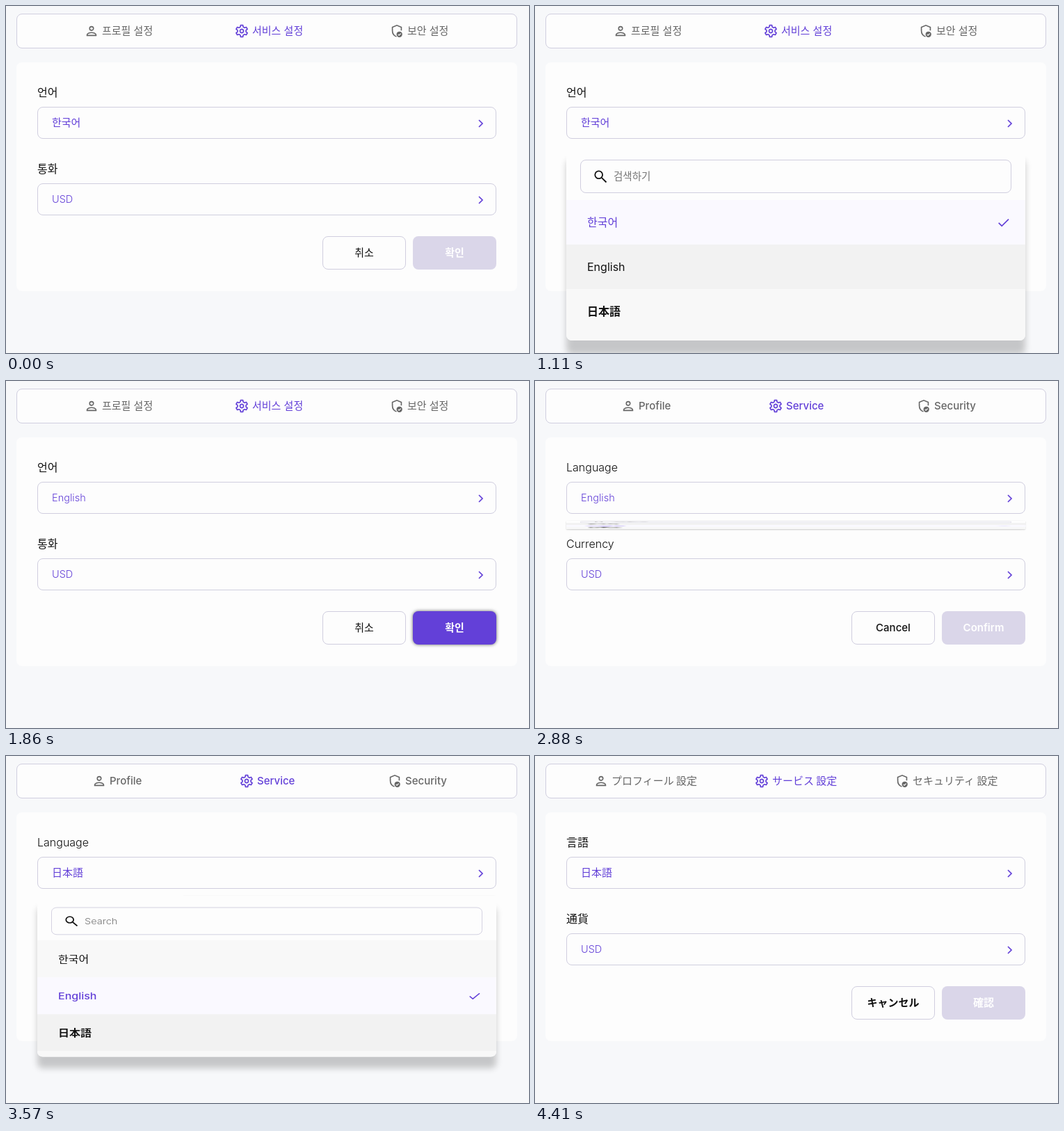
Recreate the animation shown at these times as an HTML page. Size 752 by 499 pixels, loop 5.82 s.

```html
<!DOCTYPE html>
<html lang="ko">
<head>
<meta charset="utf-8">
<title>Service settings</title>
<style>
@property --p { syntax: "<number>"; inherits: false; initial-value: 0; }

:root { --violet: #6340d8; --line: #d0cedf; --off: #dad6e9; --paper: #fdfdfd; --loop: 5820ms; }
html, body { margin: 0; width: 100%; height: 100%; overflow: hidden; background: #f7f8fa; }
body { position: relative; color: #111; font: 300 14.5px/20px Inter, sans-serif; }
div, span, svg { position: absolute; box-sizing: border-box; white-space: nowrap; }
svg { overflow: visible; fill: none; stroke: currentColor; }

/* languages */
[lang=ko] { font-family: "Noto Sans CJK KR", sans-serif; }
[lang=ja] { font-family: "Noto Sans CJK JP", sans-serif; }
span[lang=ko], span[lang=ja], .lang[lang=ko] span, .lang[lang=ja] span { margin-top: -1px; font-size: 15px; }
.lang { inset: 0; }
.lang.ko { animation: lang-ko var(--loop) step-end infinite; }
.lang.en { animation: lang-en var(--loop) step-end infinite; }
.lang.ja { animation: lang-ja var(--loop) step-end infinite; }
@keyframes lang-ko { 0% { visibility: visible } 40.722%, 100% { visibility: hidden } }
@keyframes lang-en { 0%, 75.773%, 100% { visibility: hidden } 40.722% { visibility: visible } }
@keyframes lang-ja { 0% { visibility: hidden } 75.773%, 100% { visibility: visible } }

/* frame */
.bar { left: 15px; top: 11px; width: 720px; height: 50px; border: 1px solid var(--line); border-radius: 8px; background: var(--paper); }
.card { left: 15px; top: 81px; width: 720px; height: 329px; border-radius: 8px; background: var(--paper); }
.field { left: 45px; width: 660px; height: 46px; border: 1px solid var(--line); border-radius: 8px; color: var(--violet); }
.field span { left: 20px; top: 12px; }
.field svg { left: 633px; top: 17px; stroke-width: 1.7; }

/* tabs */
.tab { top: 25px; height: 22px; color: #666; font-weight: 500; }
.tab svg { left: 0; top: 0; stroke-width: 1.8; }
.tab span { left: 26px; top: 1px; font-size: 15px; }
.tab.on { color: var(--violet); }
.lang .label { left: 45px; font-size: 16px; }
.lang[lang=ko] .label, .lang[lang=ja] .label { font-size: 16px; font-weight: 400; }

/* buttons */
.btn { top: 331px; width: 120px; height: 48px; border-radius: 8px; }
.cancel { left: 455px; border: 1px solid var(--line); background: var(--paper); animation: cancel var(--loop) step-end infinite; }
.confirm { left: 585px; background: var(--off); animation: confirm var(--loop) step-end infinite; }
.lang .cap { top: 345px; width: 120px; text-align: center; font-size: 15px; font-weight: 500; }
.lang[lang=ja] .cap, .lang .cap.ok { font-weight: 700; }
.lang[lang=en] .cap.ok { font-weight: 600; }
.no { left: 455px; }
.ok { left: 585px; color: #fff; }
@keyframes cancel {
  0%, 65.464%, 100% { border-color: var(--line); box-shadow: 0 0 5px #0000 }
  62.887% { border-color: var(--violet); box-shadow: 0 0 5px #000a }
}
@keyframes confirm {
  0%, 37.113%, 72.165%, 100% { background: var(--off); box-shadow: 0 0 5px #0000 }
  25.773%, 60.825% { background: var(--violet); box-shadow: 0 0 5px #0000 }
  31.959%, 66.495% { background: var(--violet); box-shadow: 0 0 5px #0009 }
  35.567%, 70.619% { background: var(--violet); box-shadow: 0 0 5px #0009; animation-timing-function: steps(3, start) }
}

/* chosen language */
.v1 { animation: v1 var(--loop) step-end infinite; }
.v2 { animation: v2 var(--loop) step-end infinite; }
.v3 { animation: v3 var(--loop) step-end infinite; }
@keyframes v1 { 0% { visibility: visible } 25.773%, 100% { visibility: hidden } }
@keyframes v2 { 0%, 60.825%, 100% { visibility: hidden } 25.773% { visibility: visible } }
@keyframes v3 { 0% { visibility: hidden } 60.825%, 100% { visibility: visible } }

/* drop-down */
.panel {
  --q: max(0, var(--p));
  left: 45px; top: 201px; width: 660px; height: 280px; border-radius: 8px;
  background: linear-gradient(var(--paper) 78px, #f8f8f8 78px);
  box-shadow: 0 20px 10px #0003;
  transform-origin: top;
  transform: scaleY(calc(var(--q) * var(--q) * (3 - 2 * var(--q))));
  animation: unfold var(--loop) linear infinite;
}
@keyframes unfold {
  0% { --p: 0 }
  11.34%, 49.485% { --p: 0; animation-timing-function: steps(8, start) }
  15.464%, 53.608% { --p: 1 }
  25.773%, 60.825% { --p: 1; animation-timing-function: steps(8, start) }
  29.897%, 64.948%, 100% { --p: -.06 }
}
.search { left: 20px; top: 20px; width: 620px; height: 48px; border: 1px solid var(--line); border-radius: 8px; }
.search svg { left: 19px; top: 14px; stroke-width: 1.8; }
.panel .hint { left: 68px; top: 34px; color: #757575; }
.panel .lang[lang=ko] .hint { font-size: 14.5px; }
.hover, .row { left: 0; width: 660px; height: 64px; }
.hover { top: 78px; background: #f2f2f2; animation: hover var(--loop) step-end infinite; }
@keyframes hover {
  0% { transform: translateY(64px) }
  49.485% { transform: none }
  54.639% { transform: translateY(64px) }
  56.701%, 100% { transform: translateY(128px) }
}
.r1 { top: 78px; }
.r2 { top: 142px; }
.r3 { top: 206px; }
.panel .row span { left: 30px; top: 22px; font-size: 16px; font-weight: 500; }
.panel .row span[lang=en] { margin-top: 0; font-family: Inter, sans-serif; font-weight: 400; }
.panel .row span[lang=ko] { margin-top: -1px; }
.panel .row span[lang=ja] { margin-top: -1px; font-weight: 700; }
.row svg { display: none; left: 621px; top: 27px; stroke-width: 1.7; }
.row.sel { color: var(--violet); background: #faf9ff; }
.panel .row.sel span[lang=en] { font-weight: 500; }
.row.sel svg { display: block; }
</style>
</head>
<body>
<svg width="0" height="0">
  <symbol id="person" viewBox="-12 -12 24 24">
    <circle cy="-4" r="3"/>
    <path d="M-7 7V6C-7 3.6-2.5 2.4 0 2.4S7 3.6 7 6V7Z"/>
  </symbol>
  <symbol id="gear" viewBox="-12 -12 24 24">
    <path stroke-linejoin="round" d="M-2.2-6.4-1.8-9.1H1.8L2.2-6.4 4.4-5.1 7-6.1 8.8-3 6.6-1.3V1.3L8.8 3 7 6.1 4.4 5.1 2.2 6.4 1.8 9.1H-1.8L-2.2 6.4-4.4 5.1-7 6.1-8.8 3-6.6 1.3V-1.3L-8.8-3-7-6.1-4.4-5.1Z"/>
    <circle r="2.8"/>
  </symbol>
  <symbol id="shield" viewBox="-12 -12 24 24">
    <path d="M-.6 8.8C-4.6 7.4-7 3.6-7-.6V-6L0-8.9 7-6V-.8"/>
    <circle cx="4" cy="5.2" r="4.5" fill="currentColor" stroke="none"/>
    <path stroke="#fdfdfd" stroke-width="1.3" d="M1.9 5.3 3.4 6.8 6.2 4"/>
  </symbol>
  <symbol id="chevron" viewBox="0 0 8 12"><path d="M1 1 6 6 1 11"/></symbol>
  <symbol id="check" viewBox="0 0 16 12"><path d="M.7 5.8 5.2 10.3 15 .7"/></symbol>
  <symbol id="lens" viewBox="0 0 20 20"><circle cx="6.7" cy="6.7" r="5.4"/><path d="M10.8 10.8 17.5 17.5"/></symbol>
</svg>

<div class="bar"></div>
<div class="card"></div>

<div class="field" style="top:145px">
  <span class="v1" lang="ko">한국어</span>
  <span class="v2" lang="en">English</span>
  <span class="v3" lang="ja">日本語</span>
  <svg width="8" height="12"><use href="#chevron"/></svg>
</div>
<div class="field" style="top:255px">
  <span lang="en">USD</span>
  <svg width="8" height="12"><use href="#chevron"/></svg>
</div>
<div class="btn cancel"></div>
<div class="btn confirm"></div>

<div class="lang ko" lang="ko">
  <div class="tab" style="left:112px"><svg width="22" height="22"><use href="#person"/></svg><span>프로필 설정</span></div>
  <div class="tab on" style="left:328px"><svg width="22" height="22"><use href="#gear"/></svg><span>서비스 설정</span></div>
  <div class="tab" style="left:551px"><svg width="22" height="22"><use href="#shield"/></svg><span>보안 설정</span></div>
  <span class="label" style="top:114px">언어</span>
  <span class="label" style="top:224px">통화</span>
  <span class="cap no">취소</span>
  <span class="cap ok">확인</span>
</div>

<div class="lang en" lang="en">
  <div class="tab" style="left:123px"><svg width="22" height="22"><use href="#person"/></svg><span>Profile</span></div>
  <div class="tab on" style="left:335px"><svg width="22" height="22"><use href="#gear"/></svg><span>Service</span></div>
  <div class="tab" style="left:548px"><svg width="22" height="22"><use href="#shield"/></svg><span>Security</span></div>
  <span class="label" style="top:114px">Language</span>
  <span class="label" style="top:224px">Currency</span>
  <span class="cap no">Cancel</span>
  <span class="cap ok">Confirm</span>
</div>

<div class="lang ja" lang="ja">
  <div class="tab" style="left:84px"><svg width="22" height="22"><use href="#person"/></svg><span>プロフィール 設定</span></div>
  <div class="tab on" style="left:315px"><svg width="22" height="22"><use href="#gear"/></svg><span>サービス 設定</span></div>
  <div class="tab" style="left:517px"><svg width="22" height="22"><use href="#shield"/></svg><span>セキュリティ 設定</span></div>
  <span class="label" style="top:114px">言語</span>
  <span class="label" style="top:224px">通貨</span>
  <span class="cap no">キャンセル</span>
  <span class="cap ok">確認</span>
</div>

<div class="panel">
  <div class="search"><svg width="20" height="20"><use href="#lens"/></svg></div>
  <div class="hover"></div>
  <div class="lang ko" lang="ko">
    <span class="hint">검색하기</span>
    <div class="row r1 sel"><span lang="ko">한국어</span><svg width="16" height="12"><use href="#check"/></svg></div>
    <div class="row r2"><span lang="en">English</span></div>
    <div class="row r3"><span lang="ja">日本語</span></div>
  </div>
  <div class="lang en" lang="en">
    <span class="hint">Search</span>
    <div class="row r1"><span lang="ko">한국어</span></div>
    <div class="row r2 sel"><span lang="en">English</span><svg width="16" height="12"><use href="#check"/></svg></div>
    <div class="row r3"><span lang="ja">日本語</span></div>
  </div>
</div>
</body>
</html>
```
